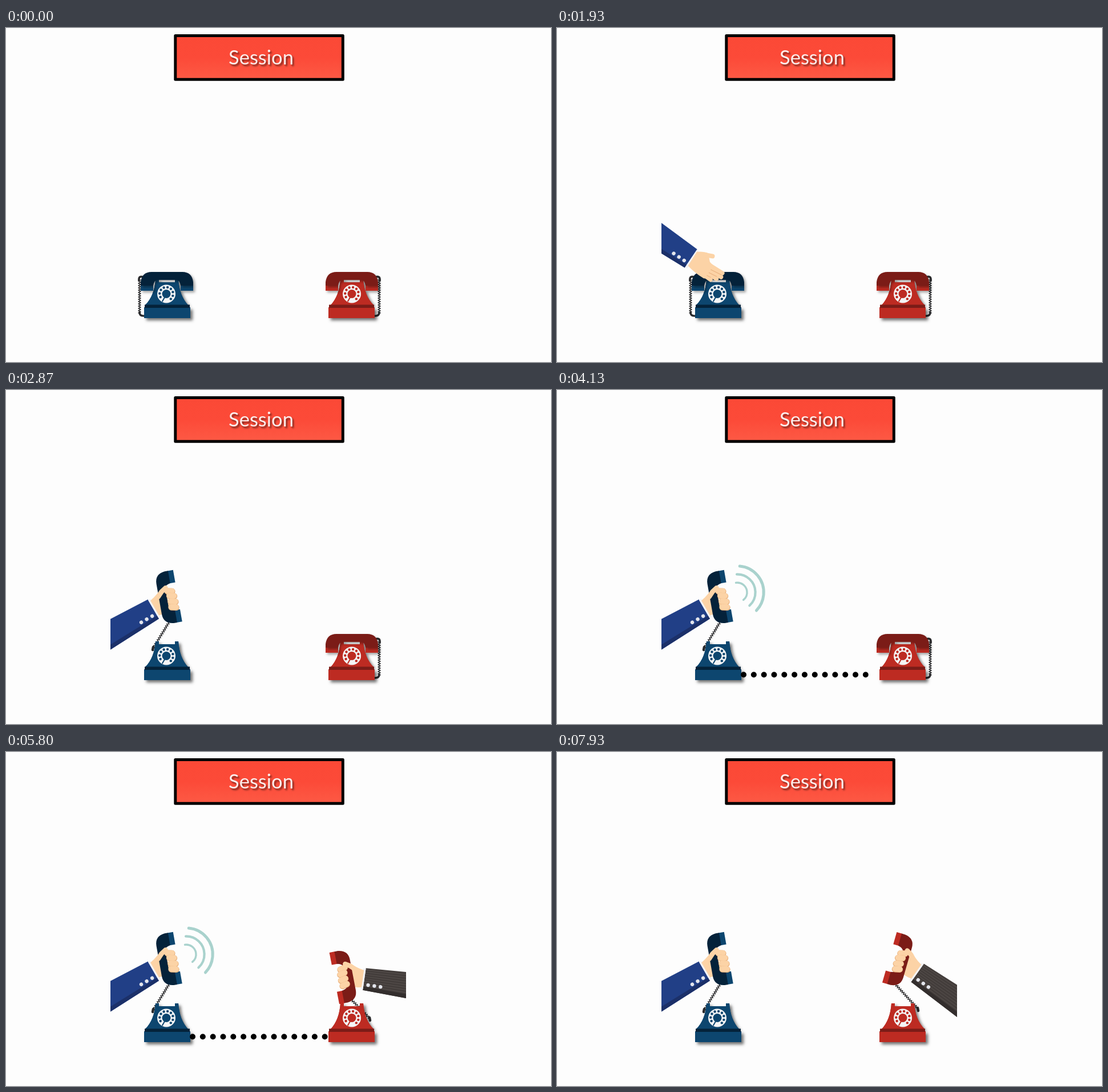
These frames come from a looping animation (955 px wide and 586 px high, 8 s). An HTML page with a canvas:

```html
<!DOCTYPE html>
<html lang="en">
<head>
<meta charset="utf-8">
<title>Session</title>
<style>
html, body { margin: 0; width: 100%; height: 100%; overflow: hidden; background: #fdfdfd; }
canvas { display: block; }
</style>
</head>
<body>
<canvas id="stage" width="955" height="586"></canvas>
<script>
const ctx = document.getElementById('stage').getContext('2d');
const LOOP = 8000;
const SKIN = '#fcd3a6', SKIN_EDGE = '#e9b27f', CORD = '#2a2a2c';

// Each side is drawn in blue orientation around x = 0; the red one is mirrored.
const blue = {
  x: 282, flip: 1, start: 1270, main: '#0d466f', dark: '#04223a',
  sleeve: '#213f86', shade: '#1b3069', arm: [-24, 384, -30], handset: [2, 364, -100],
  anchor: [-25, 455], wave: [34, 355]
};
const red = {
  x: 606, flip: -1, start: 4470, main: '#bd2b22', dark: '#7b1c17',
  sleeve: '#433d3b', shade: '#332e2d', stripe: '#5b5452', arm: [-26, 387, -35], handset: [7, 365, -106],
  anchor: [-27, 453], wave: [33, 346]
};

const shapes = {
  handset: new Path2D('M-46 8V2Q-44-16-27-16H27Q44-16 46 2V8H24Q22-2 17-2H-17Q-22-2-24 8Z'),
  body: new Path2D('M-20 441h6v5h28v-5h6Q22 470 37 486H-38Q-22 470-20 441Z'),
  sleeve: new Path2D('M0-19L-140-25V26L0 20Z'),
  hem: new Path2D('M0 14L-140 18V26L0 20Z'),
  palm: new Path2D('M3-15Q20-18 36-27L40-14Q29-8 28 14Q16 19 3 15Z'),
  openPalm: new Path2D('M2-15Q12-23 20-24L31-13L46-9L46 12L38 17Q20 18 3 14Z')
};

const clamp = v => Math.max(0, Math.min(1, v));
const ramp = (t, from, to) => clamp((t - from) / (to - from));

function keyed(t, times, rows) {
  let i = 0;
  while (i < times.length - 2 && t > times[i + 1]) i++;
  const p = ramp(t, times[i], times[i + 1]);
  return rows[i].map((v, k) => v + (rows[i + 1][k] - v) * p);
}

function group(draw, [x, y, angle] = [0, 0, 0]) {
  ctx.save();
  ctx.translate(x, y);
  ctx.rotate(angle * Math.PI / 180);
  draw();
  ctx.restore();
}

function fill(color, path) {
  ctx.fillStyle = color;
  ctx.fill(path);
}

function rect(color, ...box) {
  ctx.fillStyle = color;
  ctx.fillRect(...box);
}

function disc(color, x, y, r) {
  ctx.fillStyle = color;
  ctx.beginPath();
  ctx.arc(x, y, r, 0, 7);
  ctx.fill();
}

function line(color, width, ...points) {
  ctx.strokeStyle = color;
  ctx.lineWidth = width;
  ctx.beginPath();
  for (let i = 0; i < points.length; i += 2) ctx.lineTo(points[i], points[i + 1]);
  ctx.stroke();
}

function dropShadow(dx, dy, blur, alpha) {
  ctx.shadowColor = `rgba(0,0,0,${alpha})`;
  ctx.shadowOffsetX = dx;
  ctx.shadowOffsetY = dy;
  ctx.shadowBlur = blur;
}

function coil(x0, y0, x1, y1) {
  const length = Math.hypot(x1 - x0, y1 - y0), n = Math.max(4, Math.round(length / 2));
  const nx = -(y1 - y0) / length, ny = (x1 - x0) / length, points = [];
  for (let i = 0; i <= n; i++) {
    const p = i / n, a = i % 2 ? 2 : -2;
    points.push(x0 + (x1 - x0) * p + nx * a, y0 + (y1 - y0) * p + ny * a);
  }
  line(CORD, 1.4, ...points);
}

function restingCord() {
  coil(-48, 442, -48, 500);
  ctx.strokeStyle = CORD;
  ctx.lineWidth = 3.5;
  ctx.stroke(new Path2D('M-41 437Q-50 434-49 443M-48 499Q-48 506-39 505'));
}

function liftedCord(side, u, [x, y, angle]) {
  const a = angle * Math.PI / 180, c = Math.cos(a), s = Math.sin(a);
  const [ax, ay] = keyed(u, [800, 1330, 1600], [[-48, 500], [-32, 470], side.anchor]);
  coil(x - 42 * c + 5 * s, y - 42 * s - 5 * c, ax + 2, ay - 4);
  line(CORD, 4.5, ax + 1, ay - 4, ax, ay + 1);
}

function dial(side) {
  group(() => {
    ctx.scale(side.flip, 1);
    disc('#f4f5f6', 0, 0, 16);
    disc(side.main, 0, 0, 7.5);
    for (let i = 0; i < 9; i++) {
      const a = 2.65 + i * .56;
      disc(side.main, 11.8 * Math.cos(a), 11.8 * Math.sin(a), 2.2);
    }
    line(side.main, 2, -3, 6, -7, 13);
  }, [side.flip < 0 ? 0 : -1, 466.5, 0]);
}

function phoneBody(side) {
  ctx.save();
  dropShadow(4, 4, 5, .55);
  fill(side.main, shapes.body);
  rect(side.main, -40, 490, 81, 19);
  ctx.restore();
  fill(side.main, shapes.body);
  rect(side.dark, -39, 485.5, 79, 5.5);
  rect(side.main, -40, 491, 81, 18);
  dial(side);
}

function handset(side, pose, resting) {
  group(() => {
    if (resting) dropShadow(3, 3, 4, .35);
    rect(side.main, -46, 7, 22, 10);
    rect(side.main, 24, 7, 22, 10);
    fill(side.dark, shapes.handset);
  }, pose);
}

function sleeve(side) {
  fill(side.sleeve, shapes.sleeve);
  if (side.stripe) {
    for (let i = -4; i < 5; i++) line(side.stripe, .8, -1, i * 4, -140, i * 5);
  }
  fill(side.shade, shapes.hem);
  rect('#f3f3f5', 0, -18, 4.5, 37);
  for (const x of [-8, -19, -30]) disc('#e3e5ec', x, 10, 3.2);
}

function openHand() {
  fill(SKIN, shapes.openPalm);
  line(SKIN, 8, 18, -19, 29, -24);
  const tips = [[60, -9], [62, -2], [57, 5], [49, 12]];
  tips.forEach(([x, y], i) => {
    line(SKIN, 7.5, 32, -8 + i * 6.5, x, y);
    if (i) line(SKIN_EDGE, 1, 40, -9 + i * 6.2, x - 2, y - 3.5);
  });
}

function fingers() {
  const knuckles = [[40, -13], [39, -4], [36, 6], [32, 15]];
  for (const [x, y] of knuckles) {
    line(SKIN_EDGE, 11, x - 3, y - 1.5, x + 4, y + 3);
    line(SKIN, 9.8, x - 3, y - 2, x + 4, y + 2.3);
  }
  line(SKIN, 8.5, 18, -14, 28, -19, 37, -21);
}

function inStage(draw) {
  ctx.save();
  // The viewport edges, seen from either side
  ctx.beginPath();
  ctx.rect(-99, 0, 517, 586);
  ctx.clip();
  draw();
  ctx.restore();
}

function caller(side, t) {
  const u = t - side.start, lifted = u > 860;
  const arm = keyed(u, [0, 660, 800, 960, 1330, 1600],
    [[-157, 305, 34], [-47, 404, 34], [-47, 404, 34], [-32, 414, 18], [-22, 398, -8], side.arm]);
  const held = keyed(u, [800, 960, 1330, 1600],
    [[0, 444, 0], [7, 428, -45], [14, 394, -79], side.handset]);
  ctx.save();
  ctx.translate(side.x, 0);
  ctx.scale(side.flip, 1);
  if (lifted) liftedCord(side, u, held);
  else restingCord();
  phoneBody(side);
  if (u > 0) {
    const clipX = side.flip > 0 ? -99 : -95;
    ctx.beginPath();
    ctx.rect(clipX, 0, 500, 586);
    ctx.save();
    ctx.clip();
    if (lifted) {
      group(() => { sleeve(side); fill(SKIN, shapes.palm); }, arm);
      handset(side, held);
      group(fingers, arm);
    } else {
      handset(side, held, true);
      group(() => { sleeve(side); openHand(); }, arm);
    }
    ctx.restore();
  } else {
    handset(side, held, true);
  }
  ctx.restore();
}

function waves(side, alpha) {
  if (!alpha) return;
  ctx.save();
  ctx.globalAlpha = alpha;
  ctx.translate(side.x, 0);
  ctx.scale(side.flip, 1);
  ctx.strokeStyle = '#a9d2cd';
  for (let i = 0; i < 3; i++) {
    ctx.lineWidth = 3.4 + i * .8;
    ctx.beginPath();
    ctx.arc(...side.wave, 17 + i * 14.6, -1.72 + i * .12, .9 - i * .07);
    ctx.stroke();
  }
  ctx.restore();
}

// Row of dots revealed with a soft edge, from the left (dir 1) or the right (dir -1)
function dots(p, dir, alpha) {
  if (!p || !alpha) return;
  const edge = dir > 0 ? 315 + 260 * p : 575 - 260 * p;
  const ink = ctx.createLinearGradient(edge - dir * 10, 0, edge, 0);
  ink.addColorStop(0, '#000');
  ink.addColorStop(1, 'rgba(0,0,0,0)');
  ctx.save();
  ctx.globalAlpha = alpha;
  for (let i = 0; i < 14; i++) disc(ink, 327 + i * 17.82, 499.5, 5);
  ctx.restore();
}

function title() {
  const paint = ctx.createLinearGradient(0, 13, 0, 91);
  paint.addColorStop(0, '#fb4936');
  paint.addColorStop(.5, '#fc4a38');
  paint.addColorStop(1, '#fd5a45');
  rect(paint, 297, 14, 293, 76);
  ctx.strokeStyle = '#000';
  ctx.lineWidth = 5;
  ctx.strokeRect(296.8, 13.5, 293.5, 76.8);
  ctx.save();
  dropShadow(2.5, 2.5, 3, .5);
  ctx.font = '34.5px Lato, Carlito, sans-serif';
  ctx.textAlign = 'center';
  ctx.fillStyle = '#fbeeec';
  ctx.fillText('Session', 447, 64);
  ctx.restore();
}

// Play cue that grows while it fades
function playCue(t) {
  if (t < 530 || t >= 1000) return;
  const p = (t - 530) / 500;
  ctx.save();
  ctx.globalAlpha = 1 - p;
  ctx.translate(432.5, 319.5);
  ctx.scale(1 + p, 1 + p);
  disc('rgba(0,0,0,.5)', 0, 0, 26);
  fill('#fff', new Path2D('M-6-9L9 0L-6 9Z'));
  ctx.restore();
}

function draw(t) {
  rect('#fdfdfd', 0, 0, 955, 586);
  ctx.lineCap = ctx.lineJoin = 'round';
  title();
  caller(blue, t);
  caller(red, t);
  const end = 1 - ramp(t, 7430, 7930);
  waves(blue, ramp(t, 3000, 3300) * end);
  waves(red, ramp(t, 6170, 6500) * end);
  dots(ramp(t, 3350, 4200), 1, 1 - ramp(t, 6170, 6370));
  dots(ramp(t, 6390, 7120), -1, end);
  playCue(t);
}

const begin = performance.now();
(function tick() {
  draw((performance.now() - begin) % LOOP);
  requestAnimationFrame(tick);
})();
</script>
</body>
</html>
```
